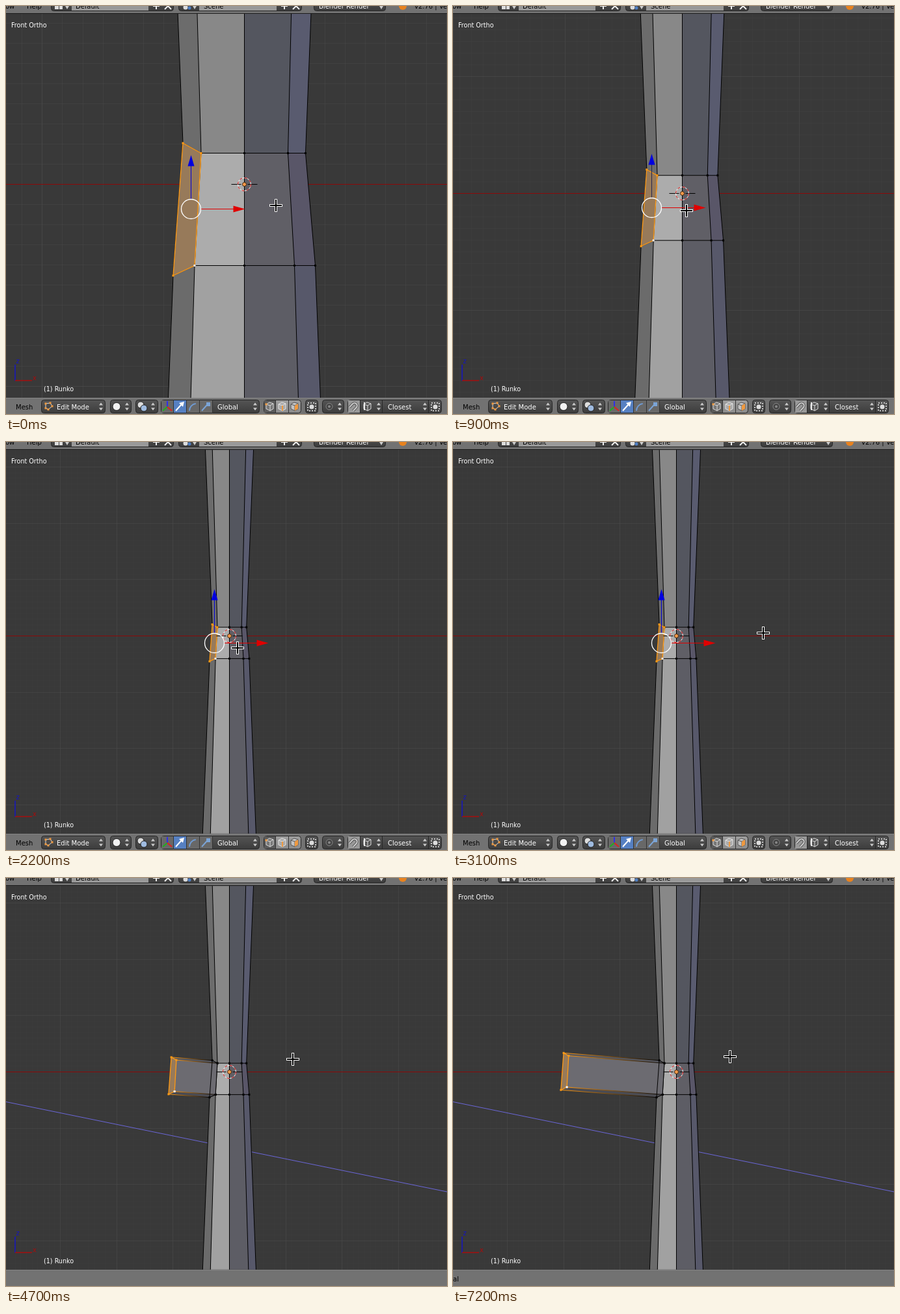
These frames come from a looping animation (678x628 px, 8000 ms). An HTML page with a canvas:

```html
<!DOCTYPE html>
<html lang="en">
<head>
<meta charset="utf-8">
<title>Extruding a face</title>
<style>
html, body { margin: 0; width: 678px; height: 628px; overflow: hidden; background: #393939; }
canvas { display: block; }
</style>
</head>
<body>
<canvas id="stage" width="678" height="628"></canvas>
<script>
const g = document.getElementById('stage').getContext('2d');
const LOOP = 8000, UNIT = 310.6, ORANGE = '#ff9a14';

// Pointer path: time, x, y
const POINTER = [
  [0, 415, 307], [500, 359, 315], [1000, 359, 315], [1200, 356, 317],
  [2600, 356, 317], [2700, 364, 317], [2800, 364, 317], [3100, 477, 294],
  [3300, 508, 283], [3500, 508, 283], [3600, 504, 282], [4400, 471, 280],
  [4700, 441, 279], [4900, 435, 278], [5300, 460, 279], [5700, 436, 276],
  [6000, 418, 275], [6200, 420, 275], [6300, 426, 275]
];
const ZOOMS = [600, 700, 900, 1100, 1200, 1500, 2200];

// Mesh columns from left to right: x, y at far top, upper ring, lower ring, far bottom
const COLUMNS = [
  [[-132.6, -1026], [-94.5, -63.5], [-109.5, 140.5], [-147.5, 1090]],
  [[-94, -1026], [-66.5, -48], [-76.5, 125], [-104.6, 1090]],
  [[0, -1026], [0, -48], [0, 125], [0, 1090]],
  [[90, -1026], [67, -48], [77, 125], [105, 1090]],
  [[132.6, -1026], [94, -48], [109, 125], [146.5, 1090]]
];
const SHADES = [
  ['#6c6c6c', '#977a5a', '#6b6b6b'],
  ['#888888', '#acacac', '#a1a1a1'],
  ['#54565f', '#605f66', '#5d5d65'],
  ['#595b6f', '#595668', '#57586a']
];

function pointerAt(t) {
  const i = POINTER.findIndex(p => p[0] > t);
  if (i < 0) return POINTER.at(-1).slice(1);
  const a = POINTER[i - 1], b = POINTER[i], f = (t - a[0]) / (b[0] - a[0]);
  return [1, 2].map(n => Math.round(a[n] + (b[n] - a[n]) * f));
}

function path(points, fill, stroke, width = 1, closed = true) {
  g.beginPath();
  points.forEach(p => g.lineTo(...p));
  if (closed) g.closePath();
  if (fill) { g.fillStyle = fill; g.fill(); }
  if (stroke) { g.strokeStyle = stroke; g.lineWidth = width; g.stroke(); }
}
const line = (x1, y1, x2, y2, color, width) => path([[x1, y1], [x2, y2]], null, color, width, false);

function circle(x, y, r, fill, stroke, width = 1) {
  g.beginPath();
  g.arc(x, y, r, 0, 7);
  if (fill) { g.fillStyle = fill; g.fill(); }
  if (stroke) { g.strokeStyle = stroke; g.lineWidth = width; g.stroke(); }
}
function dot([x, y], color = '#000') {
  g.fillStyle = color;
  g.fillRect(x - 1.5, y - 1.5, 3, 3);
}
function text(s, x, y, color = '#000', size = 10) {
  g.font = `${size}px "DejaVu Sans", sans-serif`;
  g.fillStyle = color;
  g.fillText(s, x, y);
}

function drawGrid(cx, cy, step, alpha) {
  g.strokeStyle = `rgba(76,76,76,${alpha})`;
  g.lineWidth = 1;
  g.beginPath();
  for (let x = cx - Math.floor(cx / step) * step; x < 678; x += step) {
    const px = Math.floor(x) + .5;
    g.moveTo(px, 12); g.lineTo(px, 603);
  }
  for (let y = cy - Math.floor(cy / step) * step; y < 603; y += step) {
    const py = Math.floor(y) + .5;
    g.moveTo(0, py); g.lineTo(678, py);
  }
  g.stroke();
}

function drawArm(base, shift) {
  const tip = base.map(([x, y]) => [x - shift, y - shift * .078]);
  const side = (a, b, color) => path([base[a], base[b], tip[b], tip[a]], color);
  side(0, 1, '#55565d');
  side(3, 2, '#4b4b51');
  side(1, 2, '#6c6b71');
  path(base, null, '#000');
  base.forEach((p, i) => {
    const fade = g.createLinearGradient(...tip[i], ...p);
    fade.addColorStop(0, ORANGE);
    fade.addColorStop(1, '#000');
    line(...tip[i], ...p, fade);
  });
  base.forEach(p => dot(p));
  return tip;
}

function drawGizmo(x, y, zoom) {
  const blueShaft = zoom >= 3 && zoom <= 6 ? '#26264e' : '#0000d8';
  line(x, y - 15, x, y - 67, blueShaft);
  line(x + 15, y, x + 66, y, zoom == 6 ? '#5c4a4c' : '#e00000');
  path([[x, y - 83], [x + 5, y - 66], [x - 5, y - 66]], '#0000e0');
  path([[x + 83, y], [x + 65, y - 5], [x + 65, y + 5]], '#e00000');
  circle(x, y, 15, null, '#fff', 1.3);
}

function drawCursor3d(x, y) {
  for (const [dx, dy] of [[1, 0], [-1, 0], [0, 1], [0, -1]])
    line(x + dx * 5, y + dy * 5, x + dx * 20, y + dy * 20, '#000');
  circle(x, y, 10, null, '#fff');
  g.setLineDash([3.93, 3.93]);
  circle(x, y, 10, null, '#e00000');
  g.setLineDash([]);
  circle(x, y, 3, '#f79a4a', '#3a2008');
}

function drawPointer(x, y) {
  for (const [r, w, color] of [[10, 4, '#fff'], [9, 2, '#000']]) {
    line(x - r, y, x + r, y, color, w);
    line(x, y - r, x, y + r, color, w);
  }
}

function drawView(t) {
  const zoom = ZOOMS.filter(z => t >= z).length, k = 1.2 ** -zoom;
  const cx = Math.floor(334.3 + 32.2 * k) + .5, cy = Math.floor(308 - 33.5 * k) + .5;
  const at = ([x, y]) => [cx + x * k, cy + y * k];
  const extruding = t >= 3600;
  const [mx, my] = pointerAt(t);

  g.save();
  g.beginPath();
  g.rect(0, 12, 678, 591);
  g.clip();
  g.fillStyle = '#393939';
  g.fillRect(0, 12, 678, 591);
  drawGrid(cx, cy, UNIT * k / 10, Math.max(.05, .4 * k));
  drawGrid(cx, cy, UNIT * k, .5);
  line(0, cy, 678, cy, '#8c0909');
  if (extruding) line(0, 344.5, 678, 483, '#6a66d8');

  const cols = COLUMNS.map(c => c.map(at));
  SHADES.forEach((shades, i) => shades.forEach((color, j) => {
    const a = cols[i], b = cols[i + 1];
    path([a[j], b[j], b[j + 1], a[j + 1]], color);
  }));
  cols.forEach(c => path(c, null, '#000', 1, false));
  for (const row of [1, 2]) {
    path(cols.map(c => c[row]), null, '#000', 1, false);
    cols.slice(1).forEach(c => dot(c[row]));
  }

  let face = [cols[0][1], cols[1][1], cols[1][2], cols[0][2]];
  if (extruding) {
    const shift = t >= 7200 ? 1.7 * 86.5 : t >= 6500 ? 86.5 : 504 - mx;
    face = drawArm(face, shift);
  }
  path(face, '#977a5a', ORANGE, 1.3);
  face.forEach((p, i) => dot(p, i == 2 ? '#fff' : ORANGE));

  drawCursor3d(cx, cy);
  if (!extruding) drawGizmo(...at([-82, 38]).map(v => Math.floor(v) + .5), zoom);

  text('Front Ortho', 8, 33, '#fff', 9.6);
  text('(1) Runko', 58, 593, '#fff', 9.6);
  line(14, 552, 14, 577, '#1616c0', 1.5);
  line(14, 576.5, 40, 576.5, '#a80c0c', 1.5);
  text('z', 15.5, 550, '#1616c0');
  text('x', 41, 576, '#a80c0c');
  drawPointer(mx, my);
  g.restore();
}

function button(x, y, w, h, top = '#555', bottom = '#3c3c3c', r = 4) {
  const fill = g.createLinearGradient(0, y, 0, y + h);
  fill.addColorStop(0, top);
  fill.addColorStop(1, bottom);
  g.beginPath();
  g.roundRect(x + .5, y + .5, w - 1, h - 1, r);
  g.fillStyle = fill;
  g.fill();
  g.strokeStyle = '#262626';
  g.lineWidth = 1;
  g.stroke();
}
function spin(x, y = 616.5) {
  path([[x - 3, y - 2], [x + 3, y - 2], [x, y - 6]], '#ccc');
  path([[x - 3, y + 2], [x + 3, y + 2], [x, y + 6]], '#ccc');
}
const caret = (x, y) => path([[x - 3, y], [x + 3, y], [x, y + 5]], '#ccc');
function cube(x, color, edge) {
  path([[x - 5, 613], [x, 610], [x + 6, 612], [x + 6, 620], [x + 1, 623], [x - 5, 620]], color, edge);
  path([[x - 5, 613], [x + 1, 615], [x + 1, 623]], null, edge, 1, false);
  line(x + 1, 615, x + 6, 612, edge);
}
function dottedBox(x) {
  g.setLineDash([2, 2]);
  g.strokeStyle = '#eee';
  g.lineWidth = 1.5;
  g.strokeRect(x - 6, 611, 12, 12);
  g.setLineDash([]);
  circle(x, 617, 3.5, '#ddd');
}

function drawTopBar() {
  g.fillStyle = '#727272';
  g.fillRect(0, 0, 678, 11);
  g.fillStyle = '#1c1c1c';
  g.fillRect(0, 11, 678, 1);
  text('ow', -1, 4);
  text('Help', 32, 4);
  for (const [x, w, label, tx] of [[69, 189, 'Default', 107], [265, 190, 'Scene', 304]]) {
    button(x, -12, w, 20);
    g.fillStyle = '#999';
    g.fillRect(x + 32, -1, w - 71, 8);
    text(label, tx, 4);
    caret(x + 25, 0);
    const px = x + w - 27, qx = x + w - 9;
    line(px - 5, 0, px + 5, 0, '#eee', 2);
    line(px, 0, px, 5, '#eee', 2);
    path([[qx - 5, 5], [qx, 0], [qx + 5, 5]], null, '#eee', 2, false);
  }
  g.fillStyle = '#ddd';
  g.fillRect(75, 0, 6, 5);
  g.fillRect(82, 0, 5, 5);
  circle(276, 2, 3.5, '#ddd');
  circle(282, 3, 2.5, '#4f7fc4');
  button(473, -12, 111, 20);
  text('Blender Render', 481, 4, '#fff');
  caret(577, 0);
  circle(610, 0, 6, '#e8821e');
  text('v2.76 | Ve', 628, 4);
}

function drawBottomBar(t) {
  g.fillStyle = '#727272';
  g.fillRect(0, 603, 678, 25);
  g.fillStyle = '#858585';
  g.fillRect(0, 603, 678, 1);
  if (t >= 3600) {
    if (t >= 7200) text('al', 0, 621);
    return;
  }
  const y = 606, h = 21;
  text('Mesh', 15, 621);

  button(54, y, 99, h);
  path([[61, 612], [68, 611], [71, 616], [65, 621], [61, 619]], null, '#ddd');
  for (const p of [[61, 612], [68, 611], [71, 616], [65, 621], [61, 619]]) dot(p, '#f09a40');
  text('Edit Mode', 78, 621, '#fff');
  spin(146);

  button(160, y, 33, h);
  circle(170, 616.5, 6, '#f2f2f2', '#222');
  spin(186);
  button(199, y, 35, h);
  circle(207, 614, 5, '#ddd', '#222');
  circle(212, 619, 5, '#9fbbe0', '#222');
  spin(226);

  button(238, y, 152, h);
  g.fillStyle = '#686868';
  g.fillRect(239, y + 1, 78, h - 2);
  g.fillStyle = '#5680c2';
  g.fillRect(258, y + 1, 19, h - 2);
  for (const x of [257.5, 277.5, 297.5, 317.5]) line(x, y, x, y + h, '#333');
  line(248, 617, 248, 608, '#3030e8', 2);
  line(248, 617, 241, 623, '#20b020', 2);
  line(248, 617, 255, 623, '#e02020', 2);
  line(261, 623, 270, 613, '#fff', 2);
  path([[274, 609], [266, 611], [272, 617]], '#fff');
  g.beginPath();
  g.arc(293, 623, 11, Math.PI, 4.6);
  g.strokeStyle = '#6f9bd4';
  g.lineWidth = 2;
  g.stroke();
  line(301, 623, 310, 613, '#7ba4d6', 2);
  g.fillStyle = '#7ba4d6';
  g.fillRect(308, 610, 6, 6);
  text('Global', 325, 621, '#fff');
  spin(383);

  button(396, y, 58, h, '#a0a0a0', '#8a8a8a');
  g.fillStyle = '#5a5a5a';
  g.fillRect(397, y + 1, 17, h - 2);
  for (const x of [414.5, 434.5]) line(x, y, x, y + h, '#333');
  cube(405, '#777', '#ddd');
  dot([400, 613], '#f09a40');
  cube(424, '#aaa', '#e6e6e6');
  line(425, 615, 425, 623, '#f09a40', 2);
  cube(443, '#c4c4c4', '#555');
  path([[444, 615], [449, 612], [449, 620], [444, 623]], '#f09a40');

  button(460, y, 20, h);
  dottedBox(470);
  button(486, y, 34, h);
  circle(497, 616.5, 5, '#444', '#888');
  circle(497, 616.5, 2, '#888');
  spin(513);

  button(525, y, 145, h);
  g.fillStyle = '#999';
  g.fillRect(526, y + 1, 18, h - 2);
  g.save();
  g.translate(535, 616);
  g.rotate(.75);
  g.beginPath();
  g.moveTo(-4, 6); g.lineTo(-4, -1); g.arc(0, -1, 4, Math.PI, 0); g.lineTo(4, 6);
  g.strokeStyle = '#555';
  g.lineWidth = 4;
  g.stroke();
  g.strokeStyle = '#ccc';
  g.lineWidth = 2;
  g.stroke();
  g.restore();
  for (const x of [544.5, 578.5, 649.5]) line(x, y, x, y + h, '#262626');
  cube(555, '#555', '#ddd');
  line(551, 610, 551, 622, '#eee', 2);
  spin(573);
  text('Closest', 587, 621, '#fff');
  spin(644);
  dottedBox(660);
}

function frame(now) {
  const t = Math.floor(now % LOOP / 100) * 100;
  drawView(t);
  drawTopBar();
  drawBottomBar(t);
  requestAnimationFrame(frame);
}
let start;
requestAnimationFrame(function begin(now) {
  start = now;
  frame(0);
});
</script>
</body>
</html>
```
